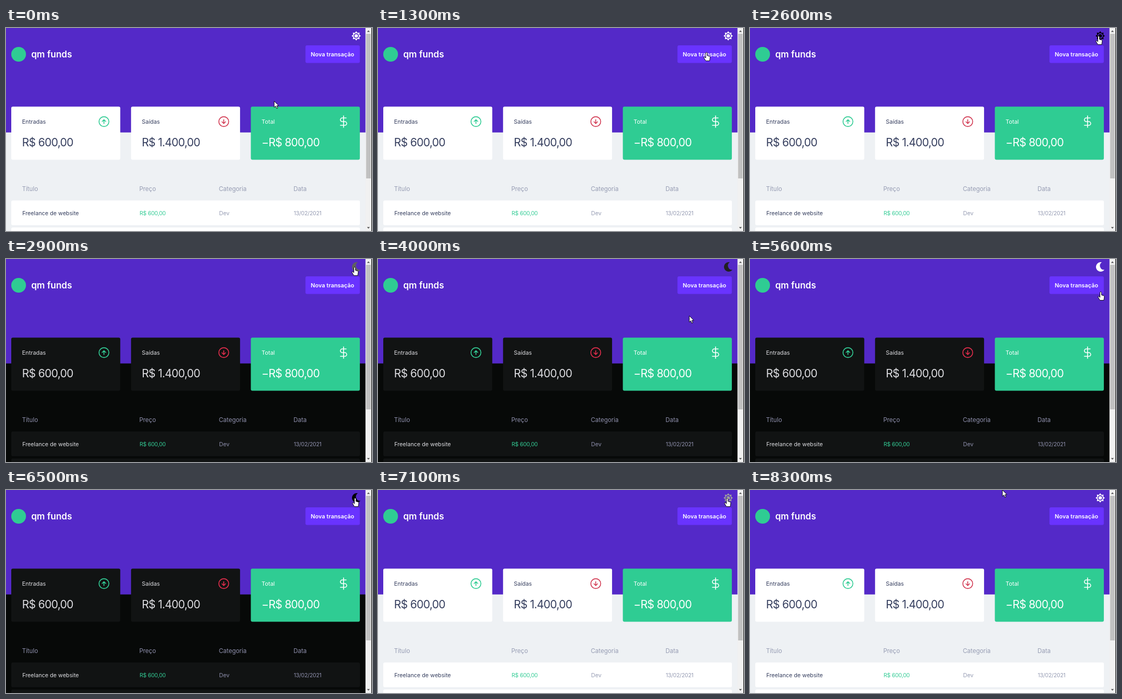
Animation of 696 by 386 pixels, one loop 8700 ms. Source, as an HTML page:

```html
<!DOCTYPE html>
<html lang="pt-BR">
<head>
<meta charset="utf-8">
<title>Transações</title>
<style>
html, body { margin: 0; width: 100%; height: 100%; overflow: hidden; }
svg { display: block; font-family: Inter, Roboto, sans-serif;
  --bg: #eef1f4; --shape: #fff; --title: #363f5f; --body: #969cb3; --green: #33cc95; --red: #d23a53; }
svg.dark { --bg: #070908; --shape: #111313; --title: #dcdce0; --body: #8f90ad; --red: #e52e4d; }
.bg { fill: var(--bg); }
.shape { fill: var(--shape); }
.title { fill: var(--title); }
.body { fill: var(--body); }
.green { fill: var(--green); }
.red { fill: var(--red); }
.white { fill: #fff; }
.line { fill: none; stroke-width: 1.6; stroke-linecap: round; stroke-linejoin: round; }
.label { font-size: 10.9px; }
.amount { font-size: 21px; letter-spacing: -.75px; }
.head { font-size: 11.5px; }
.cell { font-size: 10.7px; }
.tight { font-size: 10.5px; letter-spacing: -.25px; }
.logo { font-size: 17px; font-weight: 600; }
.button { font-size: 10.9px; font-weight: 600; }
</style>
</head>
<body>
<svg id="stage" width="696" height="386" viewBox="0 0 696 386">
  <rect class="bg" width="696" height="386"/>
  <g id="page">
    <rect width="684" height="198.6" fill="#5429c8"/>
    <circle cx="24" cy="50" r="14" fill="#2fcc93"/>
    <text class="logo white" x="48" y="56">qm funds</text>
    <rect x="569.5" y="33" width="103.3" height="33.6" rx="3" fill="#6933ff"/>
    <text class="button white" x="579.6" y="54">Nova transação</text>
    <g id="sun">
      <path id="rays"/>
      <circle cx="666" cy="15" r="5" fill="#5429c8"/>
      <circle cx="666" cy="15" r="3.3"/>
    </g>
    <path id="moon" d="M669 6.2A9 9 0 1 0 674 20.5A7.8 7.8 0 0 1 669 6.2Z"/>
    <g id="content"></g>
  </g>
  <rect x="683.6" width="11.3" height="386" fill="#f1f1f1"/>
  <rect x="694.9" width="1.1" height="386" fill="#111"/>
  <path d="M686.5 7.5l2.7-3 2.7 3zM686.5 378.5l2.7 3 2.7-3z" fill="#505050"/>
  <rect id="thumb" x="684.8" width="8.9" height="275" fill="#c1c1c1"/>
  <g id="cursor" fill="#fff" stroke="#000" stroke-width=".9" stroke-linejoin="round">
    <path id="arrow" d="M0 0V12L2.8 9.5 4.8 14 6.8 13.1 4.9 8.8H8.6Z"/>
    <path id="hand" d="M-1.5 1.3Q0 -.8 1.4 1.3V6.5L5.8 7.8Q7 8.4 6.8 10L5.8 16.5H-1.5L-5 10.5Q-5.3 8.6 -3.6 9L-1.5 11Z"/>
  </g>
</svg>
<script>
const $ = id => document.getElementById(id);
const LOOP = 8700, STEP = 100;
const CARD_TOP = 149.6, CARD_PITCH = 227.8, ROW_TOP = 328, ROW_PITCH = 51.2;
const COLUMNS = [31, 254, 405.3, 547.3];

const text = (x, y, cls, s) => `<text x="${x}" y="${y}" class="${cls}">${s}</text>`;
const box = (x, y, w, h, attr) => `<rect x="${x}" y="${y}" width="${w}" height="${h}" rx="3" ${attr}/>`;
const icon = (color, d) => `<path class="line" stroke="${color}" d="${d}"/>`;

const ring = "M-9.4 0A9.4 9.4 0 0 1 9.4 0A9.4 9.4 0 0 1 -9.4 0";
const cards = [
  ["Entradas", "R$ 600,00", icon("var(--green)", ring + "M0 3.7V-3.7M-3.4 -.3L0 -3.7 3.4 -.3")],
  ["Saídas", "R$ 1.400,00", icon("var(--red)", ring + "M0 -3.7V3.7M-3.4 .3L0 3.7 3.4 .3")],
  ["Total", "−R$ 800,00", icon("#fff",
    "M0 -11V11M5 -7H-2.5A3.5 3.5 0 0 0 -2.5 0H2.5A3.5 3.5 0 0 1 2.5 7H-6")],
];
const rows = [
  ["Freelance de website", "R$ 600,00", "Dev", "13/02/2021"],
  ["Aluguel", "- R$ 1.100,00", "Casa", "15/02/2021"],
  ["Alimentação", "- R$ 300,00", "Compras", "19/05/2022"],
];

function card([label, amount, mark], i) {
  const x = 10 + i * CARD_PITCH, total = label == "Total", color = total ? "white" : "title";
  return box(x, CARD_TOP, 207.3, 101, total ? 'fill="#2fcc93"' : 'class="shape"') +
    text(x + 20.5, 182, "label " + color, label) +
    text(x + 20.5, 225, "amount " + color, amount) +
    `<g transform="translate(${x + 176.3} 178)">${mark}</g>`;
}

function row(cells, i) {
  const y = ROW_TOP + i * ROW_PITCH;
  const price = cells[1][0] == "-" ? "red" : "green";
  const styles = ["cell title", "tight " + price, "cell body", "tight body"];
  return box(10, y, 663, 47, 'class="shape"') +
    cells.map((s, j) => text(COLUMNS[j], y + 28, styles[j], s)).join("");
}

$("content").innerHTML = [
  ...cards.map(card),
  ...["Título", "Preço", "Categoria", "Data"].map((s, j) => text(COLUMNS[j] - .6, 310, "head body", s)),
  ...rows.map(row),
].join("");

// Eight-pointed star
$("rays").setAttribute("d", "M" + Array.from({ length: 16 }, (_, i) => {
  const a = i * Math.PI / 8, r = i % 2 ? 6.2 : 9;
  return [666 + r * Math.cos(a), 15 + r * Math.sin(a)];
}).join("L") + "Z");

const FADE = 400;
const ramp = (t, from, to) => Math.min(1, Math.max(0, (t - from) / (to - from)));
const easeOut = p => 1 - (1 - p) ** 2;

const visits = [{ enter: 1600, click: 2800, leave: 3950 }, { enter: 5800, click: 7100, leave: 7500 }];
const moves = [
  { from: 700, to: 1900, x: 663, y: 15 },
  { from: 3600, to: 4000, x: 592, y: 108 },
  { from: 5300, to: 5600, x: 667, y: 62 },
  { from: 5600, to: 5800, x: 664, y: 15 },
  { from: 7500, to: 8300, x: 480, y: 0 },
];

// The icon darkens while pointed at; a click swaps it for a fresh, lighter one
function shade(t, { enter, click, leave }) {
  const since = t < click ? enter : click - 150;
  return ramp(t, since, since + FADE) - ramp(t, leave, leave + FADE);
}

function cursorAt(t) {
  let x = 510, y = 139;
  for (const m of moves) {
    const p = easeOut(ramp(t, m.from, m.to));
    x += (m.x - x) * p;
    y += (m.y - y) * p;
  }
  return [x, y];
}

const show = (id, on) => $(id).setAttribute("visibility", on ? "visible" : "hidden");

function draw(t) {
  const dark = t >= visits[0].click && t < visits[1].click;
  const scroll = 125 * (ramp(t, 4200, 4300) - ramp(t, 4900, 5185));
  const ink = 255 * (1 - shade(t, visits[0]) - shade(t, visits[1]));
  const [x, y] = cursorAt(t);
  const overIcon = x > 655 && y < 26;
  const overButton = x > 569 && x < 673 && y > 33 && y < 67;
  const hand = overIcon || overButton;
  const visible = t < 4300 || t >= 5300;

  $("stage").setAttribute("class", dark ? "dark" : "");
  $("page").setAttribute("transform", `translate(0 ${-scroll})`);
  $("thumb").setAttribute("y", 11 + scroll * .712);
  for (const id of ["sun", "moon"]) $(id).setAttribute("fill", `rgb(${ink},${ink},${ink})`);
  show("sun", !dark);
  show("moon", dark);
  $("cursor").setAttribute("transform", `translate(${x} ${y})`);
  show("hand", visible && hand);
  show("arrow", visible && !hand);
}

const start = performance.now();
function tick() {
  const t = (performance.now() - start) % LOOP;
  draw(Math.floor(t / STEP) * STEP);
  requestAnimationFrame(tick);
}
tick();
</script>
</body>
</html>
```
